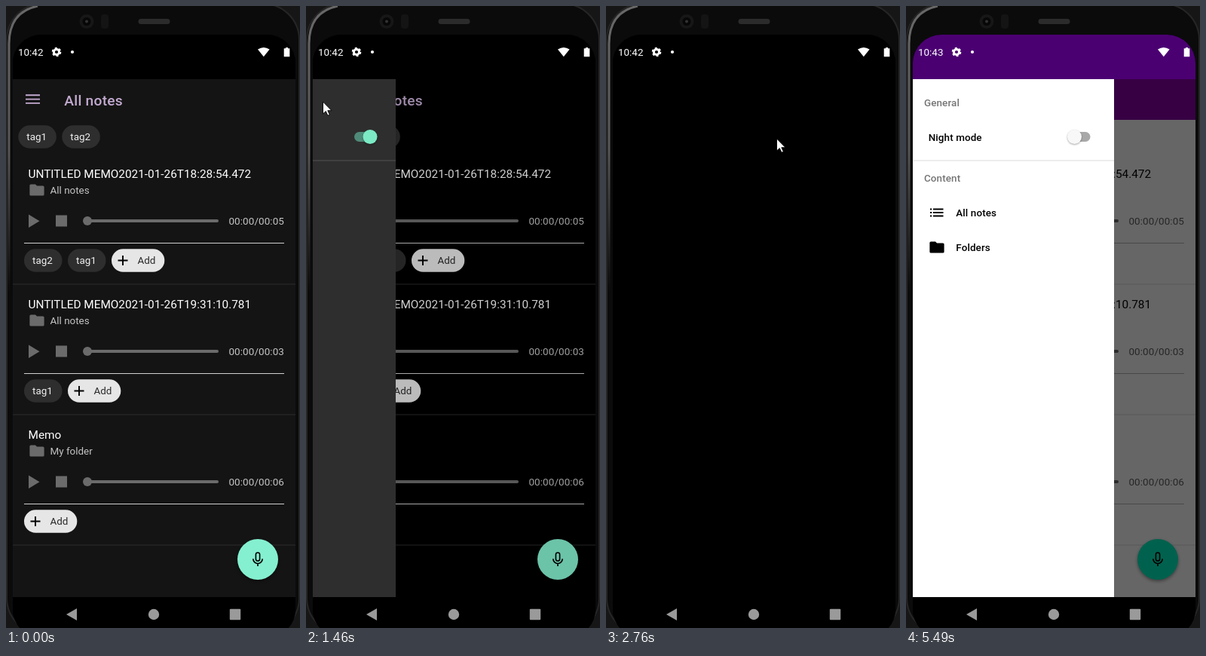
An HTML page that plays this animation: 390 by 825 pixels, repeating every 6.03 s.

```html
<!DOCTYPE html>
<html lang="en">
<head>
<meta charset="utf-8">
<title>Voice notes: night mode</title>
<style>
  html, body { margin: 0; width: 100%; height: 100%; overflow: hidden; background: #000; }
  svg {
    display: block; width: 100%; height: 100%;
    font: 13.44px Roboto, sans-serif;
    --status: #000; --bar: #141414; --bg: #141414; --ink: #fff; --soft: #c4c4c4;
    --title: #c3aad0; --icon: #6b6b6b; --chip: #2e2e2e; --chipInk: #f0f0f0;
    --add: #e6e6e6; --line: #d0d0d0; --rule: #2c2c2c; --fab: #84f0cf;
    --sheet: #2e2e2e; --head: #b8b8b8; --sheetRule: #525252;
    --track: #4f8a78; --knob: #7beac5;
  }
  svg.dim { --bar: #000; --bg: #000; }
  svg.day {
    --status: #4b0072; --bar: #8a00a8; --bg: #fff; --ink: #000; --soft: #606060;
    --title: #fff; --icon: #6b6b6b; --chip: #e0e0e0; --chipInk: #222;
    --line: #b4b4b4; --rule: #e0e0e0; --fab: #00f5c4;
    --sheet: #fff; --head: #757575; --sheetRule: #dcdcdc;
    --track: #a8a8a8; --knob: #f8f8f8;
  }
  .medium { font-weight: 500; letter-spacing: .0071em; }
  .title { font-size: 19.2px; font-weight: 500; letter-spacing: .0125em; }
  .memo { font-size: 15.35px; }
</style>
</head>
<body>
<svg id="stage" viewBox="0 0 390 825"></svg>
<script>
const LOOP = 6030;
const DRAWER = 267;
const stage = document.getElementById('stage');

const rect = (x, y, w, h, fill, r = 0, more = '') =>
  `<rect x="${x}" y="${y}" width="${w}" height="${h}" rx="${r}" fill="${fill}" ${more}/>`;
const circle = (x, y, r, fill, more = '') =>
  `<circle cx="${x}" cy="${y}" r="${r}" fill="${fill}" ${more}/>`;
const path = (d, fill, more = '') => `<path d="${d}" fill="${fill}" ${more}/>`;
const text = (x, y, s, fill, more = '') => `<text x="${x}" y="${y}" fill="${fill}" ${more}>${s}</text>`;
const folder = (x, y, fill) =>
  path(`M${x + 1.5} ${y}h6l2 2h8q1.6 0 1.6 1.6v9.8q0 1.6-1.6 1.6h-16q-1.6 0-1.6-1.6v-11.8q0-1.6 1.6-1.6z`, fill);

const tag = (x, y, name) =>
  rect(x, y, 50.5, 30.6, 'var(--chip)', 15.3) + text(x + 11, y + 19.8, name, 'var(--chipInk)');

const addChip = (x, y) =>
  rect(x, y, 70.3, 30.6, 'var(--add)', 15.3) +
  path(`M${x + 8.5} ${y + 15.3}h13m-6.5-6.5v13`, 'none', 'stroke="#000" stroke-width="1.9"') +
  text(x + 34.5, y + 19.8, 'Add', '#2c2c2c');

const memo = (index, name, place, length, tags) => `<g transform="translate(0 ${index * 173})">` +
  text(29.5, 228, name, 'var(--ink)', 'class="memo"') +
  folder(31.5, 236.5, 'var(--icon)') +
  text(58.5, 249, place, 'var(--soft)') +
  path('M30 276.5v17.5l14.5-8.7z', 'var(--icon)') +
  rect(66, 277.5, 15, 15, 'var(--icon)') +
  rect(106, 283, 176, 4, 'var(--icon)', 2) + circle(108, 285, 6, 'var(--icon)') +
  text(369, 290, '00:00/00:0' + length, 'var(--soft)', 'text-anchor="end" letter-spacing=".1"') +
  rect(24, 314, 345, 1, 'var(--line)') +
  tags.map((name, i) => tag(24 + i * 58, 322.2, name)).join('') +
  addChip(24 + tags.length * 58, 322.2) +
  rect(9, 368.5, 375, 1, 'var(--rule)') + '</g>';

const mic =
  circle(334, 736, 27, '#000', 'opacity=".4" filter="url(#blur)"') + circle(334, 734, 27, 'var(--fab)') +
  rect(331.4, 725, 5.2, 11, 'none', 2.6, 'stroke="#000" stroke-width="1.6"') +
  path('M327.8 733.3a6.2 6.2 0 0 0 12.4 0M334 739.5v3.6', 'none', 'stroke="#000" stroke-width="1.7"');

const list =
  rect(9, 97, 375, 687, 'var(--bg)') + rect(9, 97, 375, 54, 'var(--bar)') +
  path('M26 118.3h19m-19 5.3h19m-19 5.3h19', 'none', 'stroke="var(--title)" stroke-width="1.9"') +
  text(77.3, 131.5, 'All notes', 'var(--title)', 'class="title"') +
  tag(16.3, 158.2, 'tag1') + tag(74.3, 158.2, 'tag2') +
  memo(0, 'UNTITLED MEMO2021-01-26T18:28:54.472', 'All notes', 5, ['tag2', 'tag1']) +
  memo(1, 'UNTITLED MEMO2021-01-26T19:31:10.781', 'All notes', 3, ['tag1']) +
  memo(2, 'Memo', 'My folder', 6, []) + mic;

const label = (x, y, s, fill = 'var(--ink)') => text(x, y, s, fill, 'class="medium"');
const drawer =
  rect(9, 97, DRAWER, 687, 'var(--sheet)') +
  label(24, 133, 'General', 'var(--head)') + label(29.7, 178.5, 'Night mode') +
  circle(226, 175, 12, '#fff', 'id="ripple" opacity=".06"') +
  rect(221, 167, 23.5, 13, 'var(--track)', 6.5) +
  `<g id="knob">${circle(0, 1, 9.5, '#000', 'opacity=".35" filter="url(#soft)"') + circle(0, 0, 9.5, 'var(--knob)')}</g>` +
  rect(9, 204.5, DRAWER, 1, 'var(--sheetRule)') +
  label(24, 233, 'Content', 'var(--head)') +
  path('M32 269.5h2.2m1.8 0h13.5m-17.5 4.5h2.2m1.8 0h13.5m-17.5 4.5h2.2m1.8 0h13.5', 'none',
    'stroke="var(--ink)" stroke-width="1.9"') +
  label(66.3, 279, 'All notes') +
  folder(31.5, 312.5, 'var(--ink)') + label(66.3, 325, 'Folders');

const body =
  rect(0, 0, 390, 825, '#161616') +
  rect(1, -3, 388, 836, '#0b0b0b', 48, 'stroke="#262626" stroke-width="2"') +
  path('M4 380V50Q4 8 42 0', 'none', 'stroke="url(#shine)" stroke-width="3"') +
  circle(107, 20.5, 9.5, '#171717') + circle(107, 20.5, 5.5, '#070707') + circle(107, 20.5, 2, '#333') +
  rect(126, 11, 10, 19, '#141414', 4) +
  rect(175.5, 17, 42, 7, '#2b2b2b', 3.5);

const status =
  text(16, 66.3, '10:42', '#fff', 'id="clock"') +
  circle(67, 61, 3.6, 'none', 'stroke="#fff" stroke-width="3"') +
  circle(67, 61, 5.3, 'none', 'stroke="#fff" stroke-width="2" stroke-dasharray="2.8 2.75"') +
  circle(88, 61, 2.1, '#fff') +
  path('M334 57.6q7.8-5.4 15.6 0l-7.8 9.6z', '#fff') +
  path('M371 55h3v1.2h2.3v11h-7.6v-11h2.3z', '#fff');

const nav =
  rect(9, 784, 375, 41, '#000') +
  path('M80 807l14-8v16z', '#9a9a9a') + circle(196, 807, 7.2, '#9a9a9a') +
  rect(296.8, 799.8, 14.4, 14.4, '#9a9a9a', 1);

stage.innerHTML = `<defs>
    <linearGradient id="shine" x2="0" y2="1">
      <stop stop-color="#686868"/><stop offset=".5" stop-color="#585858"/>
      <stop offset="1" stop-color="#0b0b0b"/>
    </linearGradient>
    <filter id="blur" x="-30%" y="-30%" width="160%" height="160%"><feGaussianBlur stdDeviation="2"/></filter>
    <filter id="soft" x="-30%" y="-30%" width="160%" height="160%"><feGaussianBlur stdDeviation="1"/></filter>
    <clipPath id="screen"><rect x="9" y="38" width="375" height="800" rx="38"/></clipPath>
  </defs>${body}
  <g clip-path="url(#screen)">
    ${rect(9, 38, 375, 790, '#000')}${rect(9, 38, 375, 59, 'var(--status)')}
    <g id="app">${list}${rect(9, 97, 375, 687, '#000', 0, 'id="scrim"')}<g id="drawer">${drawer}</g></g>
    ${nav}
  </g>${status}
  ${path('M-.5-1v16l3.8-3.4 2.6 5.7 2.5-1.1-2.6-5.5h5.2z', '#fff', 'id="cursor" stroke="#000" stroke-width=".9"')}`;

const [app, scrim, sheet, ripple, knob, clock, cursor] =
  ['app', 'scrim', 'drawer', 'ripple', 'knob', 'clock', 'cursor'].map(id => document.getElementById(id));

const bursts = [[0, 0, 1], [210, 770, 8], [840, 920, 2], [1150, 1150, 1], [1300, 1860, 8], [1920, 2300, 6],
  [2530, 2530, 1], [2680, 2760, 2], [3140, 3140, 1], [4160, 4400, 4], [4540, 4620, 2], [4940, 5010, 2],
  [5400, 5490, 2]];

function refreshTime(t) {
  const [first, last, steps] = bursts.findLast(b => b[0] <= t);
  if (t >= last) return last;
  const gap = (last - first) / (steps - 1);
  return first + Math.floor((t - first) / gap) * gap;
}

// Pointer route: [time, x, y]
const route = [[210, 340, 800], [370, 288, 450], [530, 205, 125], [610, 150, 54], [690, 95, 76], [770, 52, 112],
  [920, 17, 127], [1150, 23, 128], [1860, 23, 128], [2072, 180, 217], [2148, 238, 214], [2300, 227, 177],
  [3140, 227, 177], [4160, 242, 178], [4400, 355, 201], [4540, 353, 200], [4620, 354, 201],
  [5010, 341, 201], [5400, 363, 585]];

function pointerAt(t) {
  const i = route.findIndex(p => p[0] >= t);
  if (t < route[0][0] || i < 0) return null;
  const [t1, x1, y1] = route[i], [t0, x0, y0] = route[Math.max(0, i - 1)];
  const k = t1 > t0 ? (t - t0) / (t1 - t0) : 1;
  return [x0 + (x1 - x0) * k, y0 + (y1 - y0) * k].map(Math.round);
}

const show = (node, on) => node.setAttribute('visibility', on ? 'visible' : 'hidden');
const move = (node, x, y) => node.setAttribute('transform', `translate(${x} ${y})`);

function render(now) {
  const t = refreshTime(now % LOOP);
  const day = t >= 3140;
  const open = 1 - (1 - Math.min(1, Math.max(0, (t - 1403.5) / 560))) ** 5;

  stage.setAttribute('class', day ? 'day' : open > 0 ? 'dim' : '');
  app.setAttribute('display', t >= 2760 && !day ? 'none' : 'inline');
  scrim.setAttribute('opacity', .6 * open ** 1.3);
  move(sheet, Math.round((open - 1) * DRAWER), 0);
  show(sheet, open > 0);
  ripple.setAttribute('display', t >= 2530 && !day ? 'inline' : 'none');
  move(knob, day ? 223.5 : t >= 2680 ? 233 : 242, 173.5);
  clock.textContent = t >= 4300 ? '10:43' : '10:42';

  const pointer = pointerAt(t);
  show(cursor, pointer);
  if (pointer) move(cursor, ...pointer);
}

const start = performance.now();
(function loop() {
  render(performance.now() - start);
  requestAnimationFrame(loop);
})();
</script>
</body>
</html>
```
